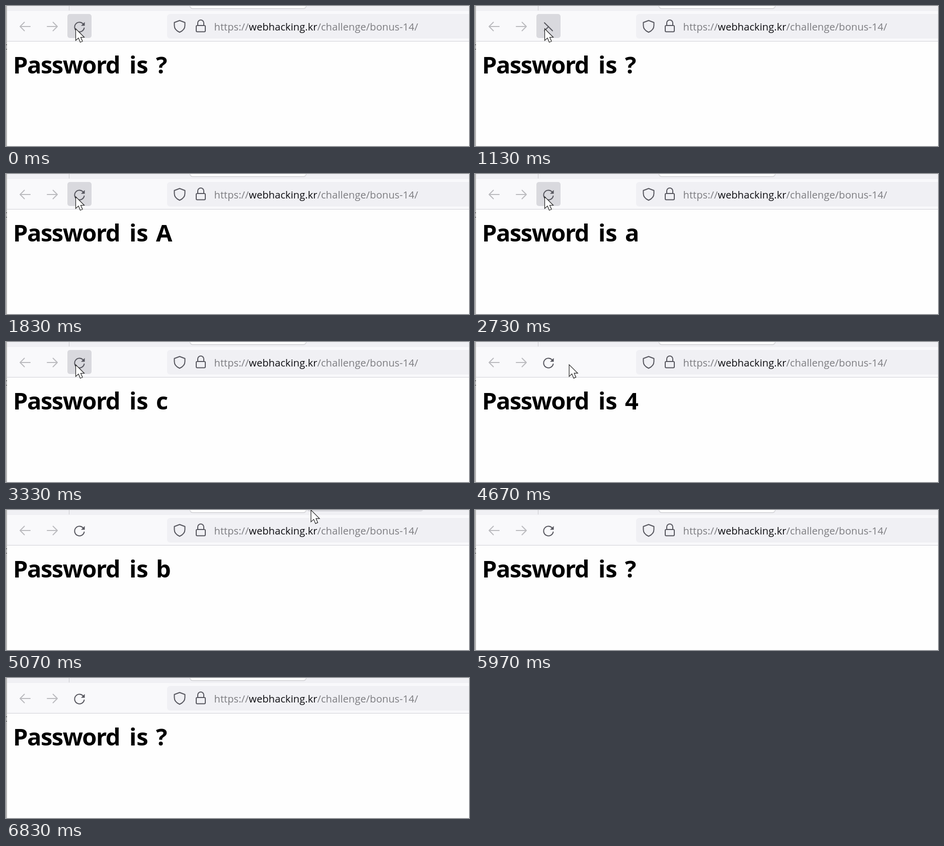
Recreate the animation shown at these times as an HTML page. Size 920 by 280 pixels, loop 6.86 s.

```html
<!DOCTYPE html>
<html lang="en">
<head>
<meta charset="utf-8">
<title>Password</title>
<style>
  html, body { margin: 0; width: 100%; height: 100%; overflow: hidden; background: #fefefe; }
  svg { display: block; }
  text { font-family: "Open Sans", "Noto Sans", sans-serif; white-space: pre; }
  .title { font-size: 47px; font-weight: 700; }
  .url { font-size: 20px; fill: #7c7c80; letter-spacing: .1px; }
  .line { fill: none; stroke: #57575f; stroke-width: 2; stroke-linecap: round; stroke-linejoin: round; }
  .off { stroke: #bbbbbf; }
</style>
</head>
<body>
<svg width="920" height="280" viewBox="0 0 920 280">
  <!-- tab strip and toolbar -->
  <rect width="920" height="10" fill="#f0f0f4"/>
  <rect y="10" width="920" height="60" fill="#f9f9fb"/>
  <rect y="70" width="920" height="1" fill="#d0d0d6"/>
  <rect x="125" width="1" height="9" fill="#cacace"/>
  <rect id="tabHover" x="598" y="-10" width="231" height="13" rx="5" fill="#d9d9de"/>
  <rect x="365" y="-10" width="232" height="16" rx="6" fill="#d0d0d4"/>
  <rect x="366" y="-10" width="230" height="14.5" rx="5" fill="#fefefe"/>
  <rect x="320" y="16" width="610" height="49" rx="6" fill="#f0f0f4"/>
  <rect width="2" height="280" fill="#b4b4b4"/>
  <path d="M0 77.5h2M0 86.5h2" stroke="#333"/>

  <!-- toolbar icons -->
  <path class="line off" d="M48 41H28m8.500-8.500L28 41l8.500 8.500"/>
  <path class="line off" d="M82 41h20m-8.500-8.500L102 41l-8.500 8.500"/>
  <rect id="button" x="122" y="16" width="48" height="48" rx="5" fill="#d9d9de"/>
  <g id="reload">
    <path class="line" d="M155.400 44A9.600 9.600 0 1 1 153 35.500"/>
    <path d="M156.500 32v7.500h-7.500z" fill="#57575f"/>
  </g>
  <g id="stop" class="line">
    <path id="down" pathLength="1" d="M138 33.500l16 16"/>
    <path id="up" pathLength="1" d="M138 49.500l16-16"/>
  </g>
  <path class="line" d="M345 29l10.500 4v6q0 9-10.500 13.500q-10.500-4.500-10.500-13.500v-6z"/>
  <path class="line" d="M381 39v-5a6 6 0 0 1 12 0v5M380 39h14a2 2 0 0 1 2 2v8.500a2 2 0 0 1-2 2h-14a2 2 0 0 1-2-2v-8.500a2 2 0 0 1 2-2z"/>
  <text class="url" x="413.500" y="49">https://<tspan fill="#0c0c10">webhacking.kr</tspan>/challenge/bonus-14/</text>

  <!-- page -->
  <g class="title">
    <text x="14" y="135" letter-spacing="-1.500">Password</text>
    <text x="245" y="135">is</text>
    <text id="char" x="298" y="135">?</text>
  </g>

  <path id="cursor" d="M.5.5v23.500l5.500-5 3.500 8.500 4.500-2-3.500-8h7z" fill="#fff" stroke="#222" stroke-width="1.200"/>
</svg>
<script>
const LOOP = 6860;
const FLAG = "FLAG{d0a_7c1e2f04db}";
const FLAG_START = 1320, CHAR_TIME = 200;
const CLICK = 1030, STOP_END = 1300;

// time, x, y of the pointer tip
const PATH = [
  [0, 138, 45], [4480, 138, 45], [4670, 185.5, 45],
  [4860, 390, 24], [5070, 605, 0], [5160, 650, -32]
];

const $ = id => document.getElementById(id);
const clamp = v => Math.min(1, Math.max(0, v));
const ramp = (t, start, length) => clamp((t - start) / length);
const show = (id, on) => $(id).style.display = on ? "" : "none";

function pointer(t) {
  const next = PATH.findIndex(p => p[0] > t);
  if (next < 0) return PATH.at(-1).slice(1);
  const [t0, x0, y0] = PATH[next - 1], [t1, x1, y1] = PATH[next];
  const k = (t - t0) / (t1 - t0);
  return [x0 + (x1 - x0) * k, y0 + (y1 - y0) * k];
}

function drawStroke(id, part) {
  $(id).style.strokeDasharray = `${part} 2`;
  $(id).style.opacity = part > 0 ? 1 : 0;
}

function draw(t) {
  const [x, y] = pointer(t);
  $("cursor").setAttribute("transform", `translate(${x} ${y})`);
  show("cursor", t < 5160);
  show("button", x < 170);
  show("tabHover", t >= 5040 && t < 5900);

  const stopping = t >= CLICK && t < STOP_END;
  show("stop", stopping);
  show("reload", !stopping);
  drawStroke("down", ramp(t, CLICK, 80));
  drawStroke("up", ramp(t, CLICK + 50, 100));
  const turn = (ramp(t, STOP_END, 150) - 1) * 90;
  $("reload").setAttribute("transform", t < CLICK ? "" : `rotate(${turn} 146 42)`);

  $("char").textContent = FLAG[Math.floor((t - FLAG_START) / CHAR_TIME)] || "?";
}

const start = performance.now();
function tick() {
  draw((performance.now() - start) % LOOP);
  requestAnimationFrame(tick);
}
draw(0);
requestAnimationFrame(tick);
</script>
</body>
</html>
```
